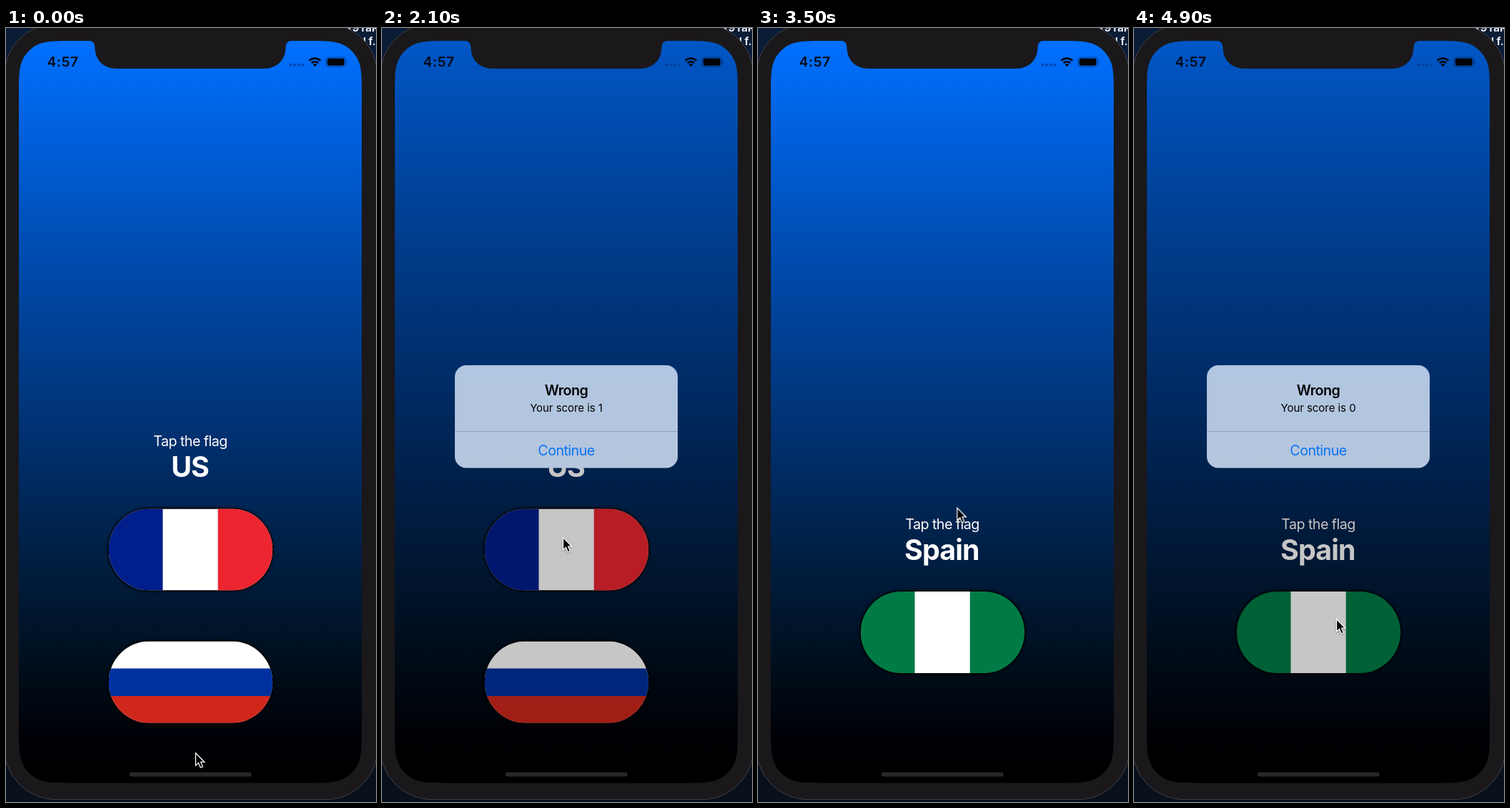
These frames come from a looping animation (518 by 1081 pixels, 5000 ms). An HTML page:

```html
<!DOCTYPE html>
<html lang="en">
<head>
<meta charset="utf-8">
<title>Flag quiz</title>
<style>
  html, body { margin: 0; width: 100%; height: 100%; overflow: hidden; background: #091524; }
  svg { display: block; width: 518px; height: 1081px; font-family: Inter, Roboto, sans-serif; }
  .mid { text-anchor: middle; }
  .body { font-size: 19.7px; letter-spacing: -.55px; }
  .title { font-size: 39.4px; font-weight: 700; letter-spacing: -.9px; }
  .note { font-size: 15px; letter-spacing: -.05px; }
  .flag { filter: drop-shadow(0 0 2px #000); }

  /* 1% = 50 ms; the picture advances every 100 ms */
  .first, .second, .press1, .press2, .dim, .pop, .fade, .cursor {
    animation: 5s step-end -20ms infinite;
  }
  .first { animation-name: first; }
  .second { animation-name: second; }
  .press1 { animation-name: press1; }
  .press2 { animation-name: press2; }
  .dim { animation-name: dim; }
  .pop { animation-name: pop; transform-origin: 258px 542.7px; }
  .fade { animation-name: fade; }
  .cursor { animation-name: cursor; }

  @keyframes first { 0% { visibility: visible; } 68%, 100% { visibility: hidden; } }
  @keyframes second { 0% { visibility: hidden; } 68%, 100% { visibility: visible; } }

  @keyframes press1 {
    0% { opacity: 1; } 30% { opacity: .7; } 32% { opacity: .5; } 34% { opacity: .62; }
    36% { opacity: .8; } 38% { opacity: .95; } 40%, 100% { opacity: 1; }
  }
  @keyframes press2 {
    0% { opacity: 1; } 86% { opacity: .7; } 88% { opacity: .5; } 90% { opacity: .62; }
    92% { opacity: .8; } 94% { opacity: .95; } 96%, 100% { opacity: 1; }
  }
  @keyframes dim {
    0% { opacity: 0; }
    32% { opacity: .04; } 34% { opacity: .13; } 36% { opacity: .18; } 38% { opacity: .21; } 40% { opacity: .225; }
    58% { opacity: .21; } 60% { opacity: .16; } 62% { opacity: .09; } 64% { opacity: .05; } 66% { opacity: .01; } 68% { opacity: 0; }
    88% { opacity: .04; } 90% { opacity: .13; } 92% { opacity: .18; } 94% { opacity: .21; } 96%, 100% { opacity: .225; }
  }
  @keyframes fade {
    0% { opacity: 0; }
    32% { opacity: .15; } 34% { opacity: .57; } 36% { opacity: .85; } 38% { opacity: .97; } 40% { opacity: 1; }
    58% { opacity: .93; } 60% { opacity: .7; } 62% { opacity: .4; } 64% { opacity: .17; } 66% { opacity: .04; } 68% { opacity: 0; }
    88% { opacity: .15; } 90% { opacity: .57; } 92% { opacity: .85; } 94% { opacity: .97; } 96%, 100% { opacity: 1; }
  }
  @keyframes pop {
    0%, 68% { transform: scale(1.18); }
    32%, 88% { transform: scale(1.15); }
    34%, 90% { transform: scale(1.075); }
    36%, 92% { transform: scale(1.025); }
    38%, 94% { transform: scale(1.006); }
    40%, 96%, 100% { transform: scale(1); }
  }
  @keyframes cursor {
    0% { transform: translate(265px, 1012px); animation-timing-function: steps(2); }
    4% { transform: translate(264px, 985px); animation-timing-function: steps(3); }
    10% { transform: translate(256px, 770px); animation-timing-function: steps(2); }
    14% { transform: translate(253px, 711px); }
    46% { transform: translate(253px, 711px); animation-timing-function: steps(2); }
    50% { transform: translate(260px, 645px); animation-timing-function: steps(3); }
    56% { transform: translate(267px, 579px); }
    66% { transform: translate(267px, 579px); animation-timing-function: steps(3); }
    72% { transform: translate(284px, 715px); animation-timing-function: steps(3); }
    78% { transform: translate(293px, 796px); }
    80% { transform: translate(293px, 796px); animation-timing-function: steps(3); }
    86%, 100% { transform: translate(283px, 825px); }
  }
</style>
</head>
<body>
<svg viewBox="0 0 518 1081">
  <defs>
    <linearGradient id="desk" x2="0" y2="1">
      <stop stop-color="#0b1c37"/>
      <stop offset="1" stop-color="#08101b"/>
    </linearGradient>
    <linearGradient id="sky" x2="0" y2="1">
      <stop stop-color="#0070ff"/>
      <stop offset=".27" stop-color="#004eb4"/>
      <stop offset=".5" stop-color="#003478"/>
      <stop offset=".72" stop-color="#001c3c"/>
      <stop offset=".85" stop-color="#000d1a"/>
      <stop offset=".94" stop-color="#000006"/>
      <stop offset="1"/>
    </linearGradient>
    <linearGradient id="panel" x2="0" y2="1">
      <stop stop-color="#b1c6e1"/>
      <stop offset="1" stop-color="#b5c6dd"/>
    </linearGradient>
    <!-- continuous-curvature corners, radius 48 -->
    <clipPath id="screen">
      <path d="M18 91.4c0-21.2 0-31.7 3.6-43.1 4.5-12.4 14.3-22.2 26.7-26.7 11.4-3.6 21.9-3.6 43.1-3.6
               H424.6c21.2 0 31.7 0 43.1 3.6 12.4 4.5 22.2 14.3 26.7 26.7 3.6 11.4 3.6 21.9 3.6 43.1
               V981c0 21.2 0 31.7-3.6 43.1-4.5 12.4-14.3 22.2-26.7 26.7-11.4 3.6-21.9 3.6-43.1 3.6
               H91.4c-21.2 0-31.7 0-43.1-3.6-12.4-4.5-22.2-14.3-26.7-26.7-3.6-11.4-3.6-21.9-3.6-43.1Z"/>
    </clipPath>
    <clipPath id="pill"><rect width="229.5" height="114" rx="57"/></clipPath>
    <rect id="rim" x="-1" y="-1" width="231.5" height="116" rx="58"/>
  </defs>

  <!-- desktop and phone body -->
  <rect width="518" height="1081" fill="url(#desk)"/>
  <g fill="#e8ebf0" font-size="15" font-weight="700">
    <text x="476" y="5">x9TaR</text>
    <text x="500" y="24">l f.,</text>
  </g>
  <rect x="-2" y="-6" width="522" height="1083.5" rx="72" fill="#1a181b" stroke="#414247"/>

  <g clip-path="url(#screen)">
    <rect x="18" y="18" width="480" height="1037" fill="url(#sky)"/>

    <g class="first">
      <g class="mid" fill="#fff">
        <text class="body" x="258" y="584">Tap the flag</text>
        <text class="title" x="257.6" y="627">US</text>
      </g>
      <g class="press1">
        <g class="flag" transform="translate(143.7 671.5)">
          <use href="#rim"/>
          <g clip-path="url(#pill)">
            <rect width="230" height="114" fill="#fff"/>
            <rect width="75.8" height="114" fill="#001e8c"/>
            <rect x="153" width="77" height="114" fill="#ed2530"/>
          </g>
        </g>
      </g>
      <g class="flag" transform="translate(143.7 856.5)">
        <use href="#rim"/>
        <g clip-path="url(#pill)">
          <rect width="230" height="114" fill="#fff"/>
          <rect y="38" width="230" height="39" fill="#00319f"/>
          <rect y="76.5" width="230" height="38" fill="#d0271d"/>
        </g>
      </g>
    </g>

    <g class="second">
      <g class="mid" fill="#fff">
        <text class="body" x="258" y="699.5">Tap the flag</text>
        <text class="title" x="257.3" y="742.5">Spain</text>
      </g>
      <g class="press2">
        <g class="flag" transform="translate(143.7 787)">
          <use href="#rim"/>
          <g clip-path="url(#pill)">
            <rect width="230" height="114" fill="#007b46"/>
            <rect x="75.8" width="77.2" height="114" fill="#fff"/>
          </g>
        </g>
      </g>
    </g>

    <rect class="dim" x="18" y="18" width="480" height="1037"/>

    <!-- panel and labels fade separately, so the panel shows through the text -->
    <g class="pop mid">
      <rect class="fade" x="102" y="471" width="312" height="143.5" rx="16" fill="url(#panel)"/>
      <g class="fade">
        <path d="M102 563.5H414" stroke="#8fa3c2"/>
        <text class="body" x="258" y="512.5" font-weight="600">Wrong</text>
        <text class="note first" x="258" y="536">Your score is 1</text>
        <text class="note second" x="258" y="536">Your score is 0</text>
        <text class="body" x="258" y="596.5" fill="#0a72f5">Continue</text>
      </g>
    </g>

    <rect x="172.5" y="1039.5" width="171" height="6" rx="3" fill="#272729"/>
  </g>

  <!-- notch and status bar -->
  <path d="M115 17.5Q124.5 18 124.5 27C124.5 45 137 56.7 155 56.7H361C379 56.7 391.5 45 391.5 27Q391.5 18 401 17.5Z" fill="#1a181b"/>
  <text x="57.6" y="54" font-size="19.2" font-weight="600" letter-spacing=".6" fill="#020a18">4:57</text>
  <g fill="#003a94" opacity=".75">
    <circle cx="398.5" cy="51.5" r="2"/><circle cx="404.3" cy="51.5" r="2"/>
    <circle cx="410.1" cy="51.5" r="2"/><circle cx="415.9" cy="51.5" r="2"/>
  </g>
  <g fill="none" stroke="#020a18" stroke-width="2.7">
    <path d="M424.6 45.6A11.3 11.3 0 0 1 440.4 45.6M427.6 49A7 7 0 0 1 437.4 49"/>
    <path d="M432.5 54L429.6 51.1A4.2 4.2 0 0 1 435.4 51.1Z" fill="#020a18" stroke="none"/>
  </g>
  <rect x="448" y="41" width="27.5" height="13" rx="3.8" fill="none" stroke="#020a18" stroke-opacity=".45"/>
  <rect x="449.7" y="42.6" width="24" height="9.8" rx="2.4" fill="#020408"/>
  <path d="M477 45.3Q479.2 47.5 477 49.7Z" fill="#020a18" opacity=".5"/>

  <g class="cursor">
    <path d="M.5 .5V18L4.5 14.3 7.3 21 10.4 19.6 7.7 13.2H12.9Z" stroke="#fff" stroke-width="1.3"
          style="filter: drop-shadow(0 1px 1px #0006)"/>
  </g>
</svg>
</body>
</html>
```
